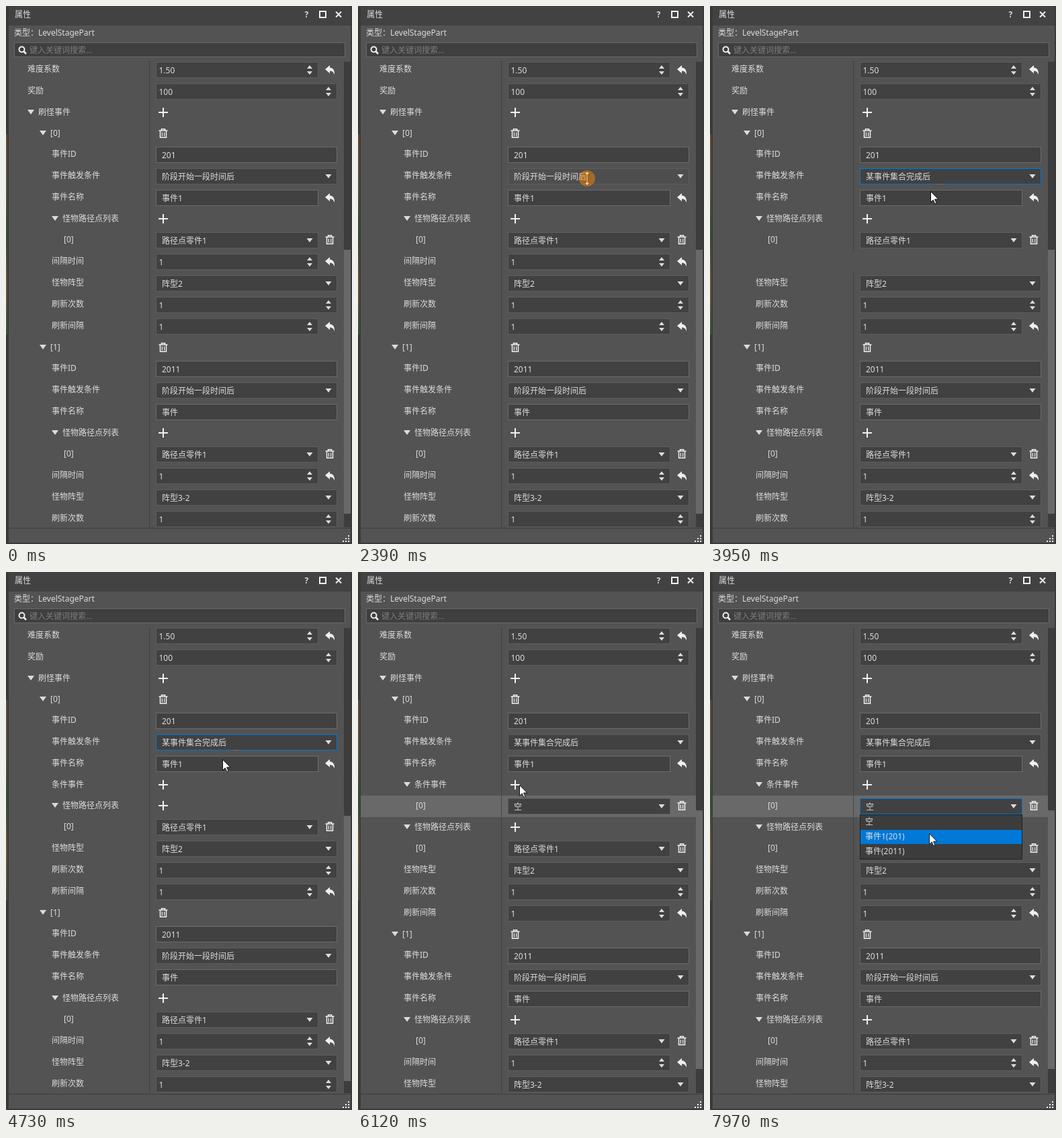
These frames come from a looping animation (515x799 px, 8 s). An HTML page:

```html
<!DOCTYPE html>
<html lang="zh-CN">
<head>
<meta charset="utf-8">
<title>属性</title>
<style>
html, body { margin: 0; width: 100%; height: 100%; overflow: hidden; background: #535353; }
svg { display: block; width: 515px; height: 799px; }
text { font: 12px "Noto Sans", "Noto Sans CJK SC", "Noto Sans CJK", sans-serif; fill: #dcdcdc; white-space: pre; }
.icon { fill: #f0f0f0; }
.line { fill: none; stroke: #f0f0f0; }
</style>
</head>
<body>
<svg viewBox="0 0 515 799">
  <defs>
    <linearGradient id="edge" x2="0" y2="1">
      <stop offset="0" stop-color="#6e4a35"/>
      <stop offset=".25" stop-color="#5d5a35"/>
      <stop offset=".5" stop-color="#35552f"/>
      <stop offset=".75" stop-color="#7a5438"/>
      <stop offset="1" stop-color="#3b5a35"/>
    </linearGradient>
    <clipPath id="view"><rect x="4" y="82" width="499" height="692"/></clipPath>
    <path id="undo" class="icon" d="M-7-1 0-7V-3.6C5-3.4 7.6 1 7 7 5.6 3.2 3.6 1.6 0 1.6V5Z"/>
    <path id="add" class="line" stroke-width="2" d="M-7 0H7M0-7V7"/>
    <g id="del" class="line" stroke-width="1.5">
      <path d="M-6.5-4H6.5M-2.5-4.5V-6.2H2.5V-4.5M-4.5-3.5V6.2H4.5V-3.5"/>
      <path stroke-width="1.2" d="M-1.6-1.5V4.5M1.6-1.5V4.5"/>
    </g>
    <path id="down" fill="#dcdcdc" d="M-4.5-3H4.5L0 3Z"/>
    <path id="spin" fill="#dcdcdc" d="M-4-2H4L0-7ZM-4 2H4L0 7Z"/>
    <path id="arrow" fill="#fff" stroke="#111" d="M.5.5V16.5L4.2 13 6.7 18.7 9 17.7 6.6 12.1H11.8Z"/>
    <path id="resize" fill="#fff" stroke="#111" d="M0-11 4.5-6H1.2V6H4.5L0 11-4.5 6H-1.2V-6H-4.5Z"/>
  </defs>
  <rect width="515" height="799" fill="#3a3a3a"/>
  <rect y="190" width="2" height="298" fill="url(#edge)"/>
  <rect x="4" width="509" height="797" fill="#535353"/>
  <rect x="4" width="509" height="29" fill="#424242"/>
  <text x="13" y="17">属性</text>
  <text x="444.500" y="17" style="font-weight:700">?</text>
  <path class="line" stroke-width="2" d="M467 8H476V17H467ZM491 8.500 499 16.500M499 8.500 491 16.500"/>
  <text x="12" y="44">类型：LevelStagePart</text>
  <rect x="12.500" y="54.500" width="492" height="21" fill="#3f3f3f" stroke="#696969"/>
  <circle class="line" stroke-width="2" cx="23.500" cy="64.500" r="4"/>
  <path class="line" stroke-width="2.500" d="M26.500 67.500 30 71"/>
  <text x="35" y="70" style="fill:#7c7c7c">键入关键词搜索...</text>
  <rect x="503" y="83" width="10" height="691" fill="#3d3d3d"/>
  <rect id="thumb" x="503" width="10" fill="#696969"/>
  <g id="rows" clip-path="url(#view)"></g>
  <path stroke="#3d3d3d" d="M4 775.500H513"/>
  <path class="line" stroke-width="2" stroke-dasharray="2 2" d="M509 787H511M505 791H511M501 795H511"/>
  <g id="popup"></g>
  <use id="cursor"/>
  <circle id="click" r="12" fill="#ff8c00" opacity=".47"/>
</svg>
<script>
const $ = id => document.getElementById(id);
const LOOP = 8000, BLUE = '#0078d7';
const AFTER_TIME = '阶段开始一段时间后', AFTER_EVENTS = '某事件集合完成后';

// start, end, target x, target y, number of steps
const moves = [
  [1050, 1690, 291, 291, 8],
  [1690, 1830, 296, 269, 2],
  [1900, 2230, 341, 256, 4],
  [3200, 3480, 328, 275, 4],
  [4580, 5380, 254, 313, 10],
  [5420, 5650, 240, 316, 3],
  [6660, 7190, 385, 353, 7],
  [7510, 7970, 326, 388, 6]
];
const clicks = [[2230, 2470], [3720, 3950], [5810, 6040], [7270, 7430]];

const within = (t, a, b) => t >= a && t < b;
const use = (id, x, y) => `<use href="#${id}" x="${x}" y="${y}"/>`;
const text = (x, y, s) => `<text x="${x}" y="${y}">${s}</text>`;
const box = (x, y, w, h, fill, stroke) =>
  `<rect x="${x + .5}" y="${y + .5}" width="${w - 1}" height="${h - 1}" fill="${fill}" stroke="${stroke}"/>`;

function pointer(t) {
  let x = 414, y = 765;
  for (const [a, b, tx, ty, n] of moves) {
    if (t < a) break;
    const k = Math.min(n, Math.floor((t - a) * n / (b - a) + 1e-6));
    const u = (1 - Math.cos(Math.PI * (k + 1) / (n + 1))) / 2;
    x += (tx - x) * u;
    y += (ty - y) * u;
  }
  return { x: Math.round(x), y: Math.round(y) };
}

// Row: kind, level, label, value, side icon, extra options
const path = () => [
  ['add', 2, '怪物路径点列表'],
  ['combo', 3, '[0]', '路径点零件1', 'del']
];
const wait = ['spin', 2, '间隔时间', '1', 'undo'];

function buildRows(s) {
  const condition = [[], [['gap']],
    [['add', 2, '条件事件', '', '', { leaf: true }]],
    [['add', 2, '条件事件'],
     ['combo', 3, '[0]', '空', 'del', { lit: s.lit, hover: s.hoverB, focus: s.focusB }]]][s.view];
  return [
    ['spin', 0, '难度系数', '1.50', 'undo'],
    ['spin', 0, '奖励', '100'],
    ['add', 0, '刷怪事件'],
    ['del', 1, '[0]'],
    ['in', 2, '事件ID', '201'],
    ['combo', 2, '事件触发条件', s.view ? AFTER_EVENTS : AFTER_TIME, '',
      { hover: s.hoverA, focus: s.focusA }],
    ['in', 2, '事件名称', '事件1', 'undo'],
    ...(s.view > 1 ? condition : []),
    ...path(),
    ...(s.view === 0 ? [wait] : s.view === 1 ? condition : []),
    ['combo', 2, '怪物阵型', '阵型2'],
    ['spin', 2, '刷新次数', '1'],
    ['spin', 2, '刷新间隔', '1', 'undo'],
    ['del', 1, '[1]'],
    ['in', 2, '事件ID', '2011'],
    ['combo', 2, '事件触发条件', AFTER_TIME],
    ['in', 2, '事件名称', '事件'],
    ...path(),
    wait,
    ['combo', 2, '怪物阵型', '阵型3-2'],
    ['spin', 2, '刷新次数', '1']
  ];
}

function drawRow([kind, level, label, value, side, opt = {}], c) {
  const header = kind === 'add' || kind === 'del';
  const h = header ? 31 : 32, top = c - 15;
  if (kind === 'gap') return { h, svg: '' };
  const indent = 18 * level, tree = header && !opt.leaf;
  let svg = opt.lit ? `<rect x="4" y="${top}" width="499" height="32" fill="#696969"/>` : '';
  svg += `<path stroke="#434343" d="M213.500 ${top}v${h}"/>`;
  if (tree) svg += `<path fill="#dcdcdc" d="M${32 + indent} ${c - 4}h10l-5 7z"/>`;
  svg += text((tree ? 48 : 32) + indent, c + 4, label);
  if (header) return { h, svg: svg + use(kind, 234, c) };

  const right = side ? 465 : 493;
  const border = opt.focus ? BLUE : kind === 'in' ? '#6b6b6b' : '#5d5d5d';
  svg += box(223, c - 11, right - 223, 24, opt.hover ? '#4e4e4e' : '#414141', border);
  svg += text(kind === 'spin' ? 227.5 : 232, c + 6, value);
  if (kind !== 'in') svg += use(kind === 'spin' ? 'spin' : 'down', right - 13, c + 1);
  if (side) svg += use(side, 482, c + (side === 'undo' ? 1 : 0));
  return { h, svg };
}

function drawRows(s) {
  let c = 94, out = '';
  for (const row of buildRows(s)) {
    if (c > 785) break;
    const { h, svg } = drawRow(row, c);
    out += svg;
    c += h;
  }
  if (s.trace) out += '<path stroke="#9a6440" d="M338 264.500h9"/>';
  return out;
}

function drawPopup({ y, w, items, pick, show }) {
  const h = Math.min(show, items.length * 22 + 1);
  let out = box(223, y, w, h, '#3c3c3c', '#222');
  items.forEach((s, i) => {
    const top = y + 22 * i;
    if (top + 21 > y + h) return;
    if (i === pick) out += `<rect x="224" y="${top + 1}" width="${w - 2}" height="21" fill="${BLUE}"/>`;
    out += text(231, top + 15, s);
  });
  return out;
}

function popupAt(t, p) {
  const pick = (top, n, current) => {
    const i = Math.floor((p.y - top) / 22);
    return i >= 0 && i < n ? i : current;
  };
  if (within(t, 2470, 3950)) return {
    y: 265, w: 270, items: [AFTER_EVENTS, AFTER_TIME], pick: pick(265, 2, 1), show: t < 2550 ? 32 : 99
  };
  if (t >= 7430) return {
    y: 360, w: 242, items: ['空', '事件1(201)', '事件(2011)'], pick: pick(360, 3, 0), show: t < 7510 ? 51 : 99
  };
  return null;
}

const cache = {};
function update(id, data, draw) {
  const key = JSON.stringify(data);
  if (cache[id] === key) return;
  cache[id] = key;
  $(id).innerHTML = data ? draw(data) : '';
}

function place(el, x, y) {
  el.setAttribute('transform', `translate(${x} ${y})`);
}

function render(t) {
  const p = pointer(t);
  const view = t < 3950 ? 0 : t < 4040 ? 1 : t < 6040 ? 2 : 3;
  update('rows', {
    view,
    lit: t >= 6120,
    hoverA: within(t, 1900, 3160),
    focusA: within(t, 2470, 5810),
    hoverB: within(t, 6660, 7430) && p.y > 336,
    focusB: t >= 7430,
    trace: within(t, 3950, 5810)
  }, drawRows);
  update('popup', popupAt(t, p), drawPopup);

  const [top, bottom] = view < 2 ? [362, 754] : view < 3 ? [362, 756] : [354, 738];
  $('thumb').setAttribute('y', top);
  $('thumb').setAttribute('height', bottom - top);

  const cursor = $('cursor'), click = $('click');
  cursor.setAttribute('href', within(t, 1600, 3200) ? '#resize' : '#arrow');
  cursor.style.display = t < 1050 ? 'none' : '';
  place(cursor, p.x, p.y);
  click.style.display = clicks.some(([a, b]) => within(t, a, b)) ? '' : 'none';
  place(click, p.x, p.y);
}

const start = performance.now();
function tick() {
  render((performance.now() - start) % LOOP);
  requestAnimationFrame(tick);
}
tick();
</script>
</body>
</html>
```
